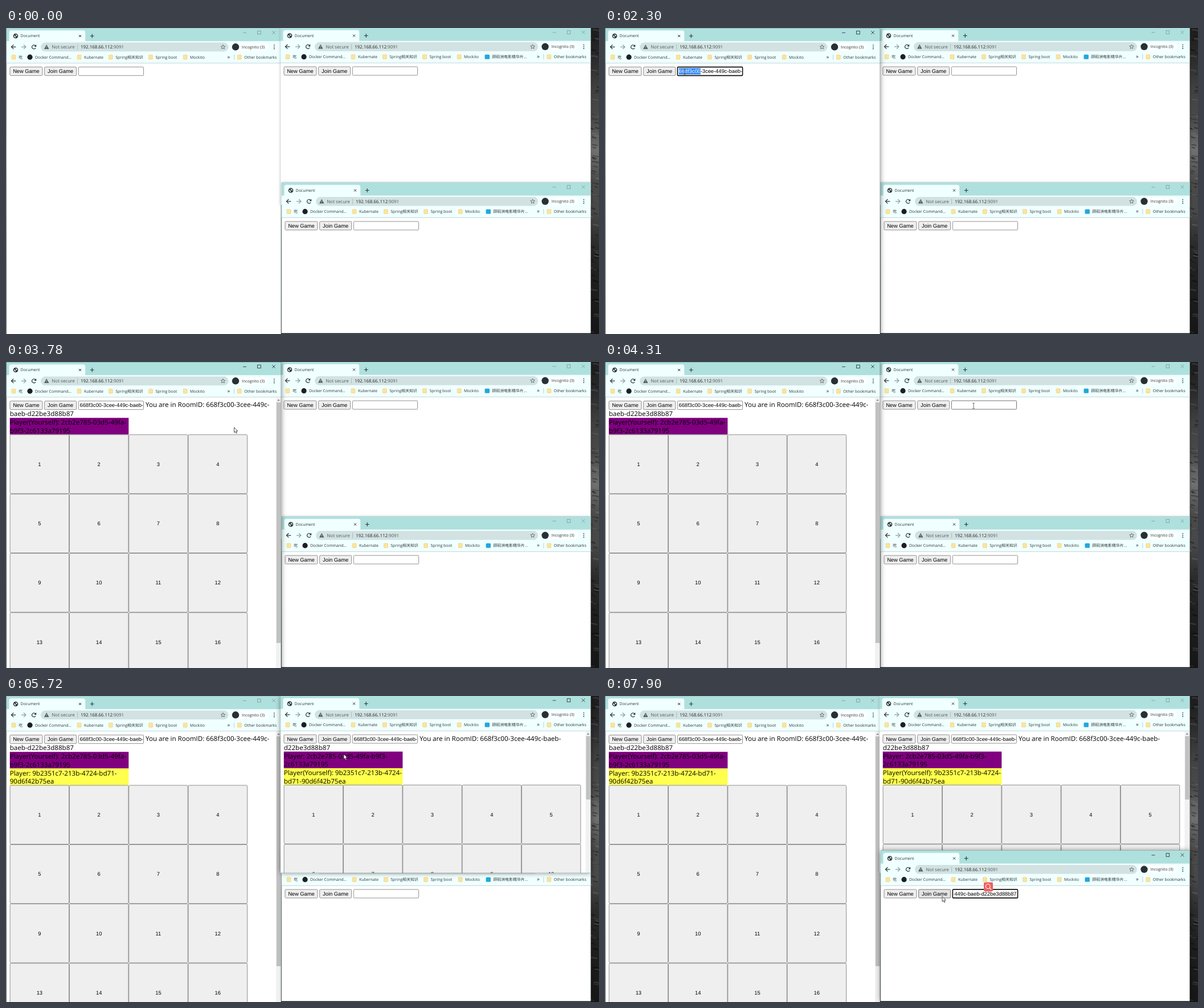
Recreate the animation shown at these times as an HTML page with a canvas. Size 1041 px wide and 538 px high, loop 8000 ms.

```html
<!DOCTYPE html>
<html lang="en">
<head>
<meta charset="utf-8">
<title>Three game windows</title>
<style>
  html, body { margin: 0; width: 100%; height: 100%; overflow: hidden; background: #222; }
  canvas { display: block; }
</style>
</head>
<body>
<canvas id="stage" width="1041" height="538"></canvas>
<script>
const ctx = document.getElementById('stage').getContext('2d');
const LOOP = 8000, TAU = Math.PI * 2;
const UI = '"Open Sans", "Noto Sans CJK SC", "Noto Sans CJK", sans-serif';
const ARIAL = '"Liberation Sans", Arial, sans-serif';
const ROOM = '668f3c00-3cee-449c-baeb-d22be3d88b87';
const PURPLE = '#800080', YELLOW = '#ffff4d', INK = '#2b3436';

// Moments at which the state jumps
const T = {
  appear: 120, newGame: 1320, roomCreated: 1480, select: 2150, word: 2230, all: 2400, leftJoin: 2920,
  leftBoard: 3000, topFocus: 4460, topPaste: 4940, topClick: 5440, topBoard: 5530,
  bottomClick: 6430, bottomFocus: 6820, bottomPaste: 7050, bottomIcon: 7200
};
const CLICKS = [T.newGame, T.select, T.leftJoin, T.topFocus, T.topClick, T.bottomClick, T.bottomFocus];

// Pointer: time, x, y
const PATH = [
  [120, 890, 439], [440, 162, 91], [560, 162, 91], [1000, 47, 73], [1560, 47, 73], [2070, 140, 77],
  [2640, 140, 77], [2880, 95, 77], [3260, 95, 77], [3780, 400.5, 115], [4080, 598, 92], [4130, 598, 92],
  [4310, 647, 77], [5060, 647, 77], [5340, 582, 80], [5660, 582, 80], [5970, 690, 300],
  [6180, 690, 300], [6400, 702, 402.5], [6560, 702, 402.5], [6780, 655, 350], [7100, 655, 350],
  [7400, 640, 409], [7820, 594, 354], [7900, 592, 352.5]
];

// Controls shared by every page, in window coordinates: x, y, width, height
const NEW = [6.9, 68.6, 57, 15], JOIN = [67.6, 68.6, 56, 15], INPUT = [127.3, 68.6, 114.2, 15];

function rect(x, y, w, h, fill) { ctx.fillStyle = fill; ctx.fillRect(x, y, w, h); }

function round(x, y, w, h, r, fill, stroke, lineWidth = 0.8) {
  ctx.beginPath();
  ctx.roundRect(x, y, w, h, r);
  if (fill) { ctx.fillStyle = fill; ctx.fill(); }
  if (stroke) { ctx.strokeStyle = stroke; ctx.lineWidth = lineWidth; ctx.stroke(); }
}

function disc(x, y, r, fill) {
  ctx.beginPath();
  ctx.arc(x, y, r, 0, TAU);
  ctx.fillStyle = fill;
  ctx.fill();
}

function line(color, width, ...points) {
  ctx.beginPath();
  for (let i = 0; i < points.length; i += 2) ctx.lineTo(points[i], points[i + 1]);
  ctx.strokeStyle = color;
  ctx.lineWidth = width;
  ctx.stroke();
}

function polygon(fill, ...points) {
  ctx.beginPath();
  for (let i = 0; i < points.length; i += 2) ctx.lineTo(points[i], points[i + 1]);
  ctx.closePath();
  ctx.fillStyle = fill;
  ctx.fill();
}

// Text placed by the vertical centre of its capitals
function label(string, x, centerY, size, color = INK, family = UI, align = 'left') {
  ctx.font = `${size}px ${family}`;
  ctx.textAlign = align;
  ctx.fillStyle = color;
  ctx.fillText(string, x, centerY + size * 0.355);
}

function cross(x, y, r, color, width = 0.9) {
  line(color, width, x - r, y - r, x + r, y + r);
  line(color, width, x - r, y + r, x + r, y - r);
}

function arrow(x, y, dir, color) {
  line(color, 1.2, x - 4 * dir, y, x + 4 * dir, y);
  line(color, 1.2, x, y - 3.8, x + 3.9 * dir, y, x, y + 3.8);
}

function reload(x, y) {
  ctx.beginPath();
  ctx.arc(x, y, 3.4, 0.5, TAU - 0.6);
  ctx.strokeStyle = INK;
  ctx.lineWidth = 1.2;
  ctx.stroke();
  polygon(INK, x + 4.2, y - 4.2, x + 4.2, y - 0.4, x + 0.4, y - 0.4);
}

function star(x, y) {
  const points = [];
  for (let i = 0; i <= 10; i++) {
    const r = i % 2 ? 1.8 : 4, a = i * TAU / 10 - TAU / 4;
    points.push(x + r * Math.cos(a), y + r * Math.sin(a));
  }
  line('#4e5b5d', 0.8, ...points);
}

function globe(x, y) {
  disc(x, y, 4.3, INK);
  polygon('#f0ffff', x - 3, y - 1, x - 0.5, y, x, y + 2.8, x - 1.2, y + 3, x - 2.6, y + 1);
  polygon('#f0ffff', x - 0.6, y - 3, x + 2.6, y - 1.8, x + 2.4, y + 1.2, x + 0.8, y - 0.6);
}

function folder(x, y) { round(x - 3.2, y - 3.8, 6.8, 7.6, 0.8, '#fde49a', '#ecca72', 0.6); }

function bookmark(name, x) { folder(x, 51.2); label(name, x + 8.7, 51.2, 6.95); }

function chrome(right, active, wide) {
  const gray = '#4e5b5d', controls = active ? '#1c2526' : '#7b9795';
  rect(0, 0, right, 23.3, '#aee0de');
  round(5.5, 4.2, 133.7, 24, 4, '#f0ffff');
  rect(0, 23.3, right, 38.4, '#f0ffff');
  rect(0, 61.4, right, 0.8, '#b4cdcc');
  globe(17, 14);
  label('Document', 25.6, 14, 6.95);
  cross(130, 14, 2, INK, 1);
  line(INK, 1.1, 147.8, 14, 154.6, 14);
  line(INK, 1.1, 151.2, 10.6, 151.2, 17.4);
  line(controls, 0.8, right - 67, 8.3, right - 61, 8.3);
  ctx.strokeRect(right - 41.4, 5.2, 5.6, 5.6);
  cross(right - 13, 8, 2.8, controls, 0.8);

  arrow(13.3, 33.3, -1, INK);
  arrow(31, 33.3, 1, '#8c9c9d');
  reload(49, 33.3);
  round(61, 25.6, right - 153.5, 15.6, 7.8, '#d2e1e1');
  polygon(gray, 71.2, 29.2, 75.4, 37, 67, 37);
  rect(70.8, 32, 0.9, 2.4, '#d2e1e1');
  rect(70.8, 35, 0.9, 0.9, '#d2e1e1');
  label('Not secure', 80.3, 33.3, 8, gray);
  rect(125.2, 28.7, 0.7, 9.4, '#9fb0b0');
  label('192.168.66.112', 131, 33.3, 7.9, '#1c2526');
  label(':9091', 131 + ctx.measureText('192.168.66.112').width, 33.3, 7.9, gray);
  star(right - 102, 33.5);
  round(right - 87, 26, 65, 14.8, 7.4, '#fbffff');
  disc(right - 80, 33.3, 6.2, '#263135');
  label('Incognito (3)', right - 69, 33.4, 6.95);
  for (const dy of [-3.2, 0, 3.2]) disc(right - 12.2, 33.3 + dy, 0.9, INK);

  folder(13.3, 51.2);
  label('吃', 22.3, 51.2, 6.95);
  disc(42, 51.2, 4.6, '#1b1f23');
  label('Docker Command...', 51, 51.2, 6.95);
  bookmark('Kubernate', 128.3);
  bookmark('Spring相关知识', 183.6);
  bookmark('Spring boot', 253.8);
  bookmark('Mockito', 314.4);
  if (wide) {
    round(359.5, 47.2, 8.4, 8, 1.5, '#22a7dc');
    label('顾砚洲电影精华片...', 372.3, 51.2, 6.95);
  }
  label('»', right - 94.5, 50.4, 9.5);
  rect(right - 83, 46.8, 0.7, 9, '#a9bcbc');
  bookmark('Other bookmarks', right - 73.4);
}

function inside([x, y, w, h], p) {
  return p && p.x >= x && p.x <= x + w && p.y >= y && p.y <= y + h;
}

function button(box, name, p) {
  const hover = inside(box, p);
  round(...box, 1.6, hover ? '#e3e3e3' : '#efefef', hover ? '#4f4f4f' : '#767676');
  label(name, box[0] + box[2] / 2, 76, 9.3, '#000', ARIAL, 'center');
}

function input({ value = '', focus, caret, selected = 0 }, p) {
  const [x, y, w, h] = INPUT, start = x + 2.2, end = x + w - 2;
  round(...INPUT, 1.4, '#fff', focus ? '#101010' : inside(INPUT, p) ? '#4f4f4f' : '#767676', focus ? 1.6 : 0.8);
  ctx.save();
  ctx.beginPath();
  ctx.rect(start - 0.3, y, end - start + 1.2, h);
  ctx.clip();
  const scrolled = focus && !selected;
  if (value) label(value, scrolled ? end : start, 76, 9.3, '#000', ARIAL, scrolled ? 'right' : 'left');
  if (selected) {
    const width = ctx.measureText(value.slice(0, selected)).width;
    rect(start, 70.6, width, 11, '#2f86f6');
    ctx.beginPath();
    ctx.rect(start, y, width, h);
    ctx.clip();
    label(value, start, 76, 9.3, '#fff', ARIAL);
  }
  if (caret) rect(value ? end + 0.1 : start, 70.8, 0.7, 10.6, '#000');
  ctx.restore();
}

function board(top, columns, bottom) {
  const size = 104.3;
  for (let row = 0; top + row * size < bottom; row++) {
    for (let col = 0; col < columns; col++) {
      const x = 6.7 + col * size, y = top + row * size;
      round(x + 0.4, y + 0.4, size - 0.8, size - 0.8, 1.6, '#efefef', '#767676');
      label(row * columns + col + 1, x + size / 2, y + size / 2, 9.3, '#000', ARIAL, 'center');
    }
  }
}

function scrollbar(right, bottom, thumbEnd, p) {
  const x = right - 9, hover = inside([x, 71, 9, thumbEnd - 71], p);
  rect(x, 62.2, 9, bottom - 62, '#f1f1f1');
  polygon('#8a8a8a', x + 4.5, 65.4, x + 7, 68.2, x + 2, 68.2);
  rect(x + 0.8, 71, 7.4, thumbEnd - 71, hover ? '#a8a8a8' : '#c1c1c1');
}

function room({ split, players, columns, thumbEnd }, right, bottom, p) {
  label('You are in RoomID: ' + ROOM.slice(0, split), 245, 75.3, 11.6, '#000');
  label(ROOM.slice(split), 6.7, 91.3, 11.6, '#000');
  players.forEach(([color, first, second], i) => {
    const y = 98.2 + i * 29.2;
    rect(6.7, y, 208.6, 29.3, color);
    label(first, 6.7, y + 8, 11.6, '#000');
    label(second, 6.7, y + 22.5, 11.6, '#000');
  });
  board(98.2 + players.length * 29.2, columns, bottom);
  scrollbar(right, bottom, thumbEnd, p);
}

function drawWindow(win, active, pointer) {
  const { x, y, right, bottom, page } = win;
  const p = pointer && { x: pointer.x - x, y: pointer.y - y };
  ctx.save();
  ctx.translate(x, y);
  ctx.shadowColor = active ? 'rgba(0,0,0,.55)' : 'rgba(0,0,0,.3)';
  ctx.shadowBlur = active ? 9 : 5;
  rect(0.7, 0, right - 0.7, bottom, '#fff');
  ctx.shadowColor = 'transparent';
  ctx.beginPath();
  ctx.rect(0.7, 0, right - 0.7, bottom);
  ctx.clip();
  chrome(right, active, right > 500);
  button(NEW, 'New Game', p);
  button(JOIN, 'Join Game', p);
  input(page, p);
  if (page.room) room(page.room, right, bottom, p);
  ctx.strokeStyle = active ? '#5d7373' : '#93a9a9';
  ctx.lineWidth = 0.8;
  ctx.strokeRect(0.7, 0, right - 0.7, bottom);
  ctx.restore();
}

function noise(i) {
  const v = Math.sin(i * 127.1) * 43758.5453;
  return v - Math.floor(v);
}

function wallpaper() {
  const shade = ctx.createLinearGradient(0, 0, 0, 538);
  const tones = ['#1c1c1c', '#2b2b2b', '#414141', '#4a4a4a', '#707070', '#4a4a4a', '#484848', '#2c2c2c', '#202020', '#1b1b1b', '#161616'];
  tones.forEach((tone, i) => shade.addColorStop(i / 10, tone));
  rect(0, 0, 1041, 538, shade);
  for (let i = 1; i < 70; i++) {
    const y = noise(i) * 538, x = 1025 + noise(i + 99) * 12, w = 4 + noise(i + 200) * 9;
    line(i % 3 ? 'rgba(0,0,0,.3)' : 'rgba(190,190,190,.16)', 1 + noise(i + 300) * 2,
      x, y, x + w / 2, y + 3 * noise(i + 400) - 1, x + w, y + 2);
  }
}

function pointerAt(t) {
  if (t < T.appear) return null;
  const next = PATH.findIndex(key => key[0] > t);
  if (next < 0) { const [, x, y] = PATH[PATH.length - 1]; return { x, y }; }
  const [t0, x0, y0] = PATH[next - 1], [t1, x1, y1] = PATH[next];
  const k = (t - t0) / (t1 - t0), e = k * k * (3 - 2 * k);
  return { x: x0 + (x1 - x0) * e, y: y0 + (y1 - y0) * e };
}

function drawPointer({ x, y }, beam) {
  if (beam) {
    line('#444', 0.8, x - 1.8, y - 5, x, y - 4.4, x + 1.8, y - 5);
    line('#444', 0.8, x, y - 4.4, x, y + 4.4);
    line('#444', 0.8, x - 1.8, y + 5, x, y + 4.4, x + 1.8, y + 5);
    return;
  }
  const shape = [0, 0, 0, 9, 2, 7.2, 3.5, 10.4, 5, 9.7, 3.6, 6.6, 6.3, 6.4, 0, 0]
    .map((v, i) => v + (i % 2 ? y : x));
  polygon('#fff', ...shape);
  line('#222', 0.8, ...shape);
}

function searchIcon(x, y) {
  round(x, y, 16, 16, 2.5, '#ee5f5f');
  ctx.beginPath();
  ctx.arc(x + 7.2, y + 7.2, 3.9, 0, TAU);
  ctx.strokeStyle = '#fff';
  ctx.lineWidth = 1.1;
  ctx.stroke();
  line('#fff', 1.1, x + 10, y + 10, x + 13, y + 13);
}

function windowsAt(t) {
  const both = t >= T.topBoard;
  const host = ['2cb2e785-03d5-49fa-', 'b9f3-2c6133a79195'];
  const hostHere = [PURPLE, 'Player(Yourself): ' + host[0], host[1]];
  const guestThere = [YELLOW, 'Player: 9b2351c7-213b-4724-bd71-', '90d6f42b75ea'];
  const hostThere = [PURPLE, 'Player: 2cb2e785-03d5-49fa-b9f3-', '2c6133a79195'];
  const guestHere = [YELLOW, 'Player(Yourself): 9b2351c7-213b-4724-', 'bd71-90d6f42b75ea'];
  const selecting = t >= T.select && t < T.leftJoin;
  const topTyping = t >= T.topFocus && t < T.topClick;
  return {
    left: { x: 0, y: 0, right: 483, bottom: 545, page: {
      value: t >= T.roomCreated ? ROOM : '',
      focus: selecting,
      selected: !selecting ? 0 : t >= T.all ? ROOM.length : t >= T.word ? 8 : 0,
      room: t >= T.leftBoard && {
        split: 19, columns: 4, thumbEnd: both ? 475 : 494,
        players: both ? [hostHere, guestThere] : [hostHere]
      }
    } },
    top: { x: 481, y: -0.5, right: 545.5, bottom: 311.7, page: {
      value: t >= T.topPaste ? ROOM : '',
      focus: topTyping, caret: topTyping,
      room: both && { split: 24, columns: 5, thumbEnd: 182.5, players: [hostThere, guestHere] }
    } },
    bottom: { x: 483, y: 271.5, right: 543.5, bottom: 265, page: {
      value: t >= T.bottomPaste ? ROOM : '',
      focus: t >= T.bottomFocus
    } }
  };
}

function draw(t) {
  const pointer = pointerAt(t), wins = windowsAt(t);
  const active = t < T.newGame ? '' : t < T.topFocus ? 'left' : t < T.bottomClick ? 'top' : 'bottom';
  const order = ['left', 'top', 'bottom'].filter(name => name !== active);
  if (active) order.push(active);

  ctx.textRendering = 'geometricPrecision';
  wallpaper();
  for (const name of order) drawWindow(wins[name], name === active, pointer);

  if (t >= T.all && t < T.leftJoin) searchIcon(146, 52.3);
  if (t >= T.bottomIcon) searchIcon(665, 327.5);
  if (!pointer) return;
  if (CLICKS.some(click => t >= click && t < click + 140)) {
    disc(pointer.x, pointer.y + 1, 7, 'rgba(255,250,60,.75)');
  }
  const overInput = Object.values(wins).some(w => inside(INPUT, { x: pointer.x - w.x, y: pointer.y - w.y }));
  drawPointer(pointer, overInput);
}

function tick(now) {
  draw(now % LOOP);
  requestAnimationFrame(tick);
}
requestAnimationFrame(tick);
</script>
</body>
</html>
```
